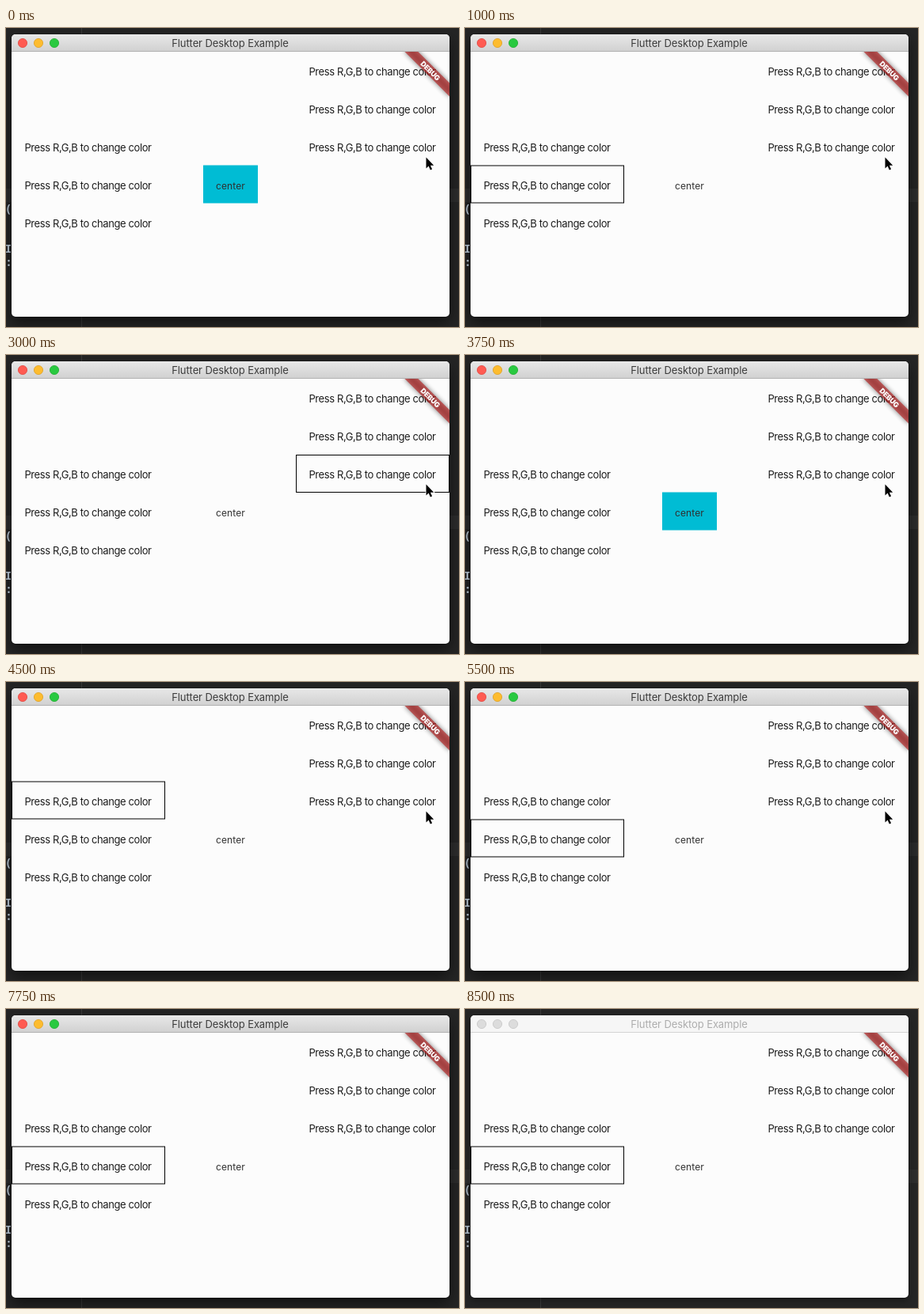
Write an HTML page that moves like this. It is 572 by 378 pixels and loops after 8.75 s.

```html
<!DOCTYPE html>
<html lang="en">
<head>
<meta charset="utf-8">
<title>Focus traversal</title>
<style>
  html, body { margin: 0; width: 100%; height: 100%; overflow: hidden; background: #252525; }
  svg { position: absolute; left: 0; top: 0; }
  #shadow {
    position: absolute; left: 7px; top: 8px; width: 553px; height: 357px; border-radius: 5px;
    box-shadow: 0 7px 18px rgba(0, 0, 0, .55), 0 0 1px #000;
  }
  #shadow.idle { box-shadow: 0 4px 10px rgba(0, 0, 0, .35), 0 0 1px #000; }
  text { text-anchor: middle; }
  .code { font: 600 14px "Noto Sans Mono", monospace; fill: #a3b0bc; }
  .title { font: 13px Inter, sans-serif; letter-spacing: -.1px; fill: #3c3c3c; }
  .label { font: 13px Inter, sans-serif; letter-spacing: -.4px; fill: #1c1c1c; }
  .center { font: 12px Inter, sans-serif; letter-spacing: .1px; fill: #303030; }
  .debug { font: 900 9px Inter, sans-serif; letter-spacing: -.2px; fill: #fff; }
  #bar { fill: url(#chrome); }
  .idle #bar { fill: #f6f6f6; }
  .idle .title { fill: #adadad; }
  .idle .light { fill: #dcdcdc; stroke: #c6c6c6; }
  .idle #rule { fill: #d4d4d4; }
</style>
</head>
<body>
<svg width="572" height="378">
  <path fill="#2d2d2d" d="M0 203h572v17H0z"/>
  <path fill="#3a3a3a" d="M95 0h1v378h-1z"/>
</svg>
<div id="shadow"></div>
<svg id="stage" width="572" height="378">
  <defs>
    <linearGradient id="chrome" x2="0" y2="1">
      <stop stop-color="#e8e8e8"/><stop offset="1" stop-color="#d0d0d0"/>
    </linearGradient>
    <clipPath id="frame"><rect x="7" y="8" width="553" height="357" rx="5"/></clipPath>
    <clipPath id="body"><path d="M7 30h553v335H7z"/></clipPath>
    <filter id="blur" x="-50%" y="-200%" width="200%" height="500%"><feGaussianBlur stdDeviation="3"/></filter>
  </defs>
  <text class="code" x="3" y="233">(</text>
  <text class="code" x="3" y="284">I</text>
  <text class="code" x="3.5" y="301">:</text>
  <g clip-path="url(#frame)">
    <path fill="#fcfcfc" d="M7 8h553v357H7z"/>
    <path id="bar" d="M7 8h553v22H7z"/>
    <path id="rule" fill="#b2b2b2" d="M7 29h553v1H7z"/>
    <text class="title" x="283" y="24">Flutter Desktop Example</text>
    <circle class="light" cx="21" cy="19" r="5.6" fill="#ff5b52" stroke="#e2463f" stroke-width=".8"/>
    <circle class="light" cx="41" cy="19" r="5.6" fill="#fdbc2f" stroke="#dfa023" stroke-width=".8"/>
    <circle class="light" cx="61" cy="19" r="5.6" fill="#29c940" stroke="#1dac2c" stroke-width=".8"/>
    <path id="cyan" fill="#00bcd4" d="M249 173.5h69v48h-69z"/>
    <text class="center" x="283.5" y="203.5">center</text>
    <g id="labels"></g>
    <rect id="ring" width="193" height="47" fill="none" stroke="#000"/>
    <g clip-path="url(#body)">
      <g transform="translate(560 30) rotate(45)">
        <path d="M-40 28h80v12h-80z" opacity=".5" filter="url(#blur)"/>
        <path fill="#b71c1c" fill-opacity=".63" d="M-40 28h80v12h-80z"/>
        <text class="debug" y="37.4">DEBUG</text>
      </g>
    </g>
  </g>
  <path id="cursor" stroke="#fff" stroke-width="1.6" paint-order="stroke"
    d="M530.5 163.5v14l3.1-2.9 2.2 5 2.3-1-2.2-4.9h4.3z"/>
</svg>
<script>
  const $ = id => document.getElementById(id);
  const LOOP = 8750;
  // Top-left corner of each focusable button; the left column sits on half pixels
  const spots = {
    L1: [7, 125.5], L2: [7, 173.5], L3: [7, 221.5],
    R1: [366, 30], R2: [366, 78], R3: [366, 126],
  };
  const focus = [
    [0, "C"], [1000, "L2"], [1250, "L1"], [1750, "L2"], [2000, "L3"], [2500, "L2"],
    [2750, "L1"], [3000, "R3"], [3500, "R1"], [3750, "C"], [4250, "L2"], [4500, "L1"],
    [5000, "L2"], [5250, "L3"], [5500, "L2"], [5750, "C"], [6000, "R3"], [6250, "R2"],
    [6500, "R1"], [7000, "C"], [7250, "L2"],
  ];

  $("labels").innerHTML = Object.values(spots).map(([x, y]) =>
    `<text class="label" x="${x + 96.5}" y="${Math.round(y) + 30}">Press R,G,B to change color</text>`).join("");

  const show = (id, on) => $(id).setAttribute("visibility", on ? "visible" : "hidden");

  function draw(now) {
    const t = now % LOOP;
    const id = focus.findLast(([start]) => start <= t)[1];
    const spot = spots[id];
    show("cyan", id === "C");
    show("ring", spot);
    if (spot) {
      $("ring").setAttribute("x", spot[0] + .5);
      $("ring").setAttribute("y", spot[1] + .5);
    }
    show("cursor", t < 7750);
    $("stage").classList.toggle("idle", t >= 8250);
    $("shadow").classList.toggle("idle", t >= 8500);
  }

  const start = performance.now();
  function tick() {
    draw(performance.now() - start);
    requestAnimationFrame(tick);
  }
  tick();
</script>
</body>
</html>
```
